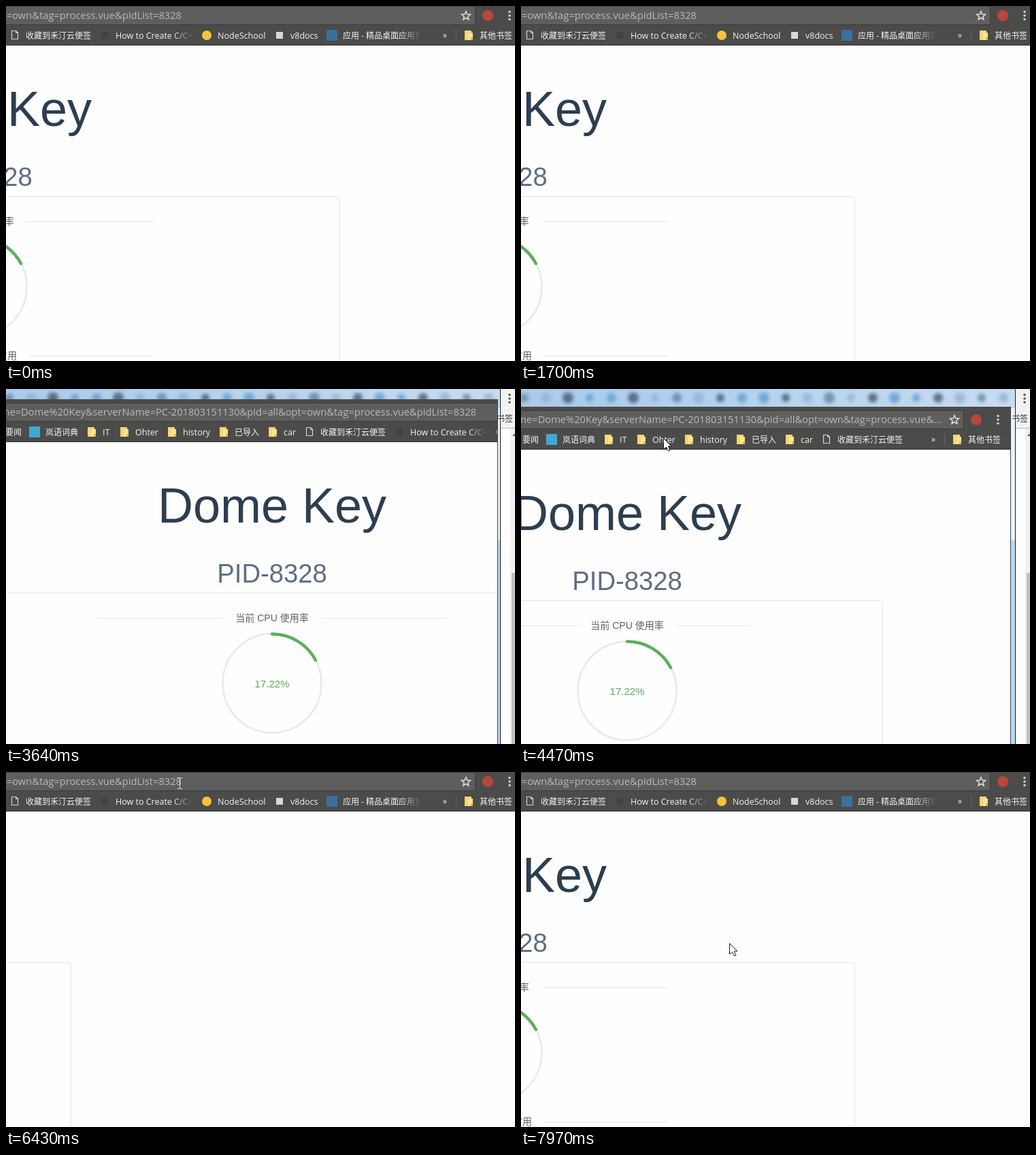
These frames come from a looping animation (748 px wide and 521 px high, 8 s). An HTML page with a canvas:

```html
<!DOCTYPE html>
<html lang="zh">
<head>
<meta charset="utf-8">
<style>
  html, body { margin: 0; width: 100%; height: 100%; overflow: hidden; background: #fefefe; }
  canvas { display: block; }
</style>
</head>
<body>
<canvas id="stage" width="748" height="521"></canvas>
<script>
const W = 748, H = 521, LOOP = 8000;
const ctx = document.getElementById('stage').getContext('2d');
const UI = "'Open Sans', 'Noto Sans CJK SC', 'Noto Sans CJK', sans-serif";
const PAGE = "'Liberation Sans', 'Noto Sans CJK SC', 'Noto Sans CJK', sans-serif";
const URL_START = 'name=Dome%20Key&serverName=PC-201803151130&pid=all&opt=own&tag=process.vue&';

// x: shift of left-aligned parts, right: window edge for right-aligned controls
const MAXIMIZED = { x: 0, y: 0, right: 758, clip: W, center: -42, half: 533 };
const SCROLLABLE = { ...MAXIMIZED, center: -50.5, half: 527, scrollbar: true };
const LIFTED = { x: 433, y: 20, right: 1191, clip: 722, center: 391, half: 533, floating: true };
const RESTORED = { x: 436, y: 31, right: 719, clip: 719, center: 156, half: 376, floating: true, narrow: true };
const REFLOWING = { ...MAXIMIZED, center: -340 + 60, half: 376 };

const LAYOUTS = [[0, MAXIMIZED], [2640, SCROLLABLE], [2800, MAXIMIZED], [3560, LIFTED],
  [3710, RESTORED], [6170, REFLOWING], [6560, MAXIMIZED]];

// time, x, y, shape; entries without a position hide the pointer
const POINTER = [
  [0], [180, 132, 15, 'beam'], [250],
  [2640, 190, 172, 'arrow'], [2710, 167, 153, 'arrow'], [2900, 120, 90, 'arrow'], [3250],
  [3850, 4, 163, 'arrow'], [4400, 190, 92, 'arrow'], [4560, 232, 46, 'beam'], [4630, 232, 38, 'beam'],
  [4710, 230, 26, 'arrow'], [5080, 241, 13, 'arrow'], [5250, 231, 2, 'arrow'], [5330, 242, 9, 'arrow'],
  [5540, 244, 13, 'arrow'], [5700, 244, 13, 'arrow'], [5850, 252, 14, 'arrow'],
  [6170, 255, 16, 'beam'], [6600, 255, 16, 'beam'], [6680, 262, 60, 'arrow'],
  [7030, 303, 235, 'arrow'], [7340, 306, 251, 'arrow'], [LOOP, 306, 251, 'arrow']
];

// label x, text, icon, icon colour, optional width at which the label fades out
const BOOKMARKS = [
  [-458, '今日要闻'],
  [-375, '岚语词典', 'square', '#3fa9d6'],
  [-291, 'IT', 'folder'], [-243, 'Ohter', 'folder'], [-173, 'history', 'folder'],
  [-97, '已导入', 'folder'], [-25, 'car', 'folder'],
  [29, '收藏到禾汀云便签', 'page'],
  [161, 'How to Create C/C++', 'small', '#3d4444', 114],
  [311, 'NodeSchool', 'dot', '#f2c43c'],
  [418, 'v8docs', 'small', '#d8d8d8'],
  [495, '应用 - 精品桌面应用集', 'square', '#3d6f9c', 114]
];

const last = (list, t) => list.filter(e => e[0] <= t).pop();

function rect(x, y, w, h, color) {
  ctx.fillStyle = color;
  ctx.fillRect(x, y, w, h);
}

function circle(x, y, r, color) {
  ctx.fillStyle = color;
  ctx.beginPath();
  ctx.arc(x, y, r, 0, 7);
  ctx.fill();
}

function text(str, x, y, size, color, family = PAGE, align = 'center') {
  ctx.font = `${size}px ${family}`;
  ctx.fillStyle = color;
  ctx.textAlign = align;
  ctx.fillText(str, x, y);
}

function polygon(points, fill, stroke, width = 1) {
  ctx.beginPath();
  points.forEach(([x, y]) => ctx.lineTo(x, y));
  ctx.closePath();
  if (fill) { ctx.fillStyle = fill; ctx.fill(); }
  if (stroke) { ctx.strokeStyle = stroke; ctx.lineWidth = width; ctx.stroke(); }
}

function menuDots(x, y, color) {
  for (const dy of [-5.5, 0, 5.5]) circle(x, y + dy, 1.8, color);
}

function icon(kind, x, y, color) {
  if (kind === 'folder') {
    rect(x - 6, y - 7, 10, 14, '#f6d673');
    rect(x - 1, y - 4, 7, 11, '#fbe394');
    rect(x + 3, y + 3, 3, 4, '#e3b94d');
  } else if (kind === 'page') {
    const px = x - 4.5, py = y - 6.5;
    polygon([[px, py], [px + 6, py], [px + 9, py + 3], [px + 9, py + 12], [px, py + 12]], null, '#d5d5d5', 1.2);
    polygon([[px + 6, py], [px + 6, py + 3], [px + 9, py + 3]], null, '#d5d5d5');
  } else if (kind === 'dot') circle(x, y, 7, color);
  else if (kind === 'square') rect(x - 8, y - 8, 16, 16, color);
  else if (kind === 'small') rect(x - 5, y - 5, 10, 10, color);
}

function label(str, x, y, fadeWidth) {
  let color = '#f4f4f4';
  if (fadeWidth) {
    color = ctx.createLinearGradient(x + fadeWidth - 30, 0, x + fadeWidth, 0);
    color.addColorStop(0, '#f4f4f4');
    color.addColorStop(1, '#f4f4f400');
  }
  text(str, x, y, /[^\x00-\x7f]/.test(str) ? 12 : 12.5, color, UI, 'left');
}

function drawToolbar({ x, right, narrow }) {
  rect(0, -5, W, 63, '#4b4b4a');
  rect(0, 0, right - 68, 28, '#3a3a3a');
  rect(0, 1, right - 69, 26, '#5e5e5d');
  rect(0, 57, W, 1, '#2f2f2f');
  if (narrow) text(URL_START + '...', right - 101, 19, 14.7, '#b9b9b9', UI, 'right');
  else text(URL_START + 'pidList=8328', x + 258, 19, 14.7, '#b9b9b9', UI, 'right');

  const star = Array.from({ length: 10 }, (_, i) => {
    const r = i % 2 ? 3 : 6.8, a = i * Math.PI / 5;
    return [right - 82 + r * Math.sin(a), 14.5 - r * Math.cos(a)];
  });
  polygon(star, null, '#dedede', 1.5);
  circle(right - 50, 14, 8, '#b8473c');
  menuDots(right - 18, 14, '#cfcfcf');

  for (const [bx, name, kind, color, fade] of BOOKMARKS) {
    if (narrow && bx > 29) break;
    icon(kind, x + bx - 16, 43, color);
    label(name, x + bx, 48, fade);
  }
  label('»', right - 116, 47);
  rect(right - 97, 35, 1, 16, '#686868');
  icon('folder', right - 78, 43);
  label('其他书签', right - 62, 48);
}

function divider(center, half, y, str, halfLabel) {
  const outer = half / 2 - 8;
  text(str, center, y + 5, 14, '#5e6166');
  for (const side of [-1, 1]) {
    const a = center + side * (halfLabel + 18), b = center + side * outer;
    rect(Math.round(Math.min(a, b)), y, Math.round(Math.abs(b - a)), 1, '#e6e7ea');
  }
}

function ring(x, y, r, share) {
  ctx.lineCap = 'round';
  for (const [part, color, width] of [[1, '#e8ebf1', 3], [share, '#58b058', 4.5]]) {
    ctx.strokeStyle = color;
    ctx.lineWidth = width;
    ctx.beginPath();
    ctx.arc(x, y, r, -Math.PI / 2, (part * 2 - 0.5) * Math.PI);
    ctx.stroke();
  }
  text((share * 100).toFixed(2) + '%', x, y + 6, 15, '#58ab57');
}

function drawPage({ center, half }) {
  rect(0, 58, W, H, '#fefefe');
  text('Dome Key', center, 176, 72, '#2c3e50');
  text('PID-8328', center, 264, 38.2, '#5e6d82');
  ctx.strokeStyle = '#e2e4e8';
  ctx.lineWidth = 1;
  ctx.beginPath();
  ctx.roundRect(Math.round(center - half) - 0.5, 279.5, half * 2, 600, 4);
  ctx.stroke();
  divider(center, half, 316, '当前 CPU 使用率', 54);
  ring(center, 412, 72.5, 0.1722);
  divider(center, half, 513, '当前进程 内存占用', 58);
}

function drawScrollbar(thumbTop) {
  rect(741, 58, 7, H, '#f1f1f1');
  rect(743, thumbTop, 5, H, '#c1c1c1');
  polygon([[744, 69], [748, 65], [748, 69]], '#555');
}

function drawBackdrop() {
  const glass = ctx.createLinearGradient(0, 0, W, 0);
  glass.addColorStop(0, '#a9cbea');
  glass.addColorStop(0.4, '#b2d2ee');
  glass.addColorStop(1, '#c9dcef');
  rect(0, 0, W, H, glass);
  const tints = ['#5c7fa0', '#4f86c4', '#6f7d8c', '#8fb0d0', '#ab7f8a', '#3f5168', '#5f9bd2'];
  ctx.save();
  ctx.filter = 'blur(2.5px)';
  ctx.globalAlpha = 0.75;
  for (let i = 0; i < 23; i++) circle(5 + i * 32, 13, 6 + i % 3, tints[i * i * 3 % 7]);
  ctx.restore();
  rect(720, 28, 6, 194, '#eaf3fb');
  rect(720, 222, 6, H, '#b9d8f3');

  rect(726, 0, 1, H, '#1d1d1d');
  rect(727, 0, 21, 57, '#f2f2f2');
  rect(727, 57, 21, 1, '#b5b5b5');
  rect(727, 58, 21, H, '#fefefe');
  menuDots(740, 14, '#5a5a5a');
  text('书签', 745, 48, 12, '#333', UI, 'right');
  drawScrollbar(270);
}

function drawWindow(layout) {
  if (layout.floating) {
    drawBackdrop();
    rect(layout.clip, layout.y - 5, 1, H, '#39444f');
  }
  ctx.save();
  ctx.beginPath();
  ctx.rect(0, Math.max(0, layout.y - 5), layout.clip, H);
  ctx.clip();
  ctx.translate(0, layout.y);
  drawPage(layout);
  drawToolbar(layout);
  if (layout.scrollbar) drawScrollbar(75);
  ctx.restore();
}

function drawPointer(t) {
  const from = last(POINTER, t);
  const [t0, x0, y0, shape] = from;
  if (!shape) return;
  const [t1, x1 = x0 - 140, y1 = y0 - 87] = POINTER[POINTER.indexOf(from) + 1];
  const k = (t - t0) / (t1 - t0);
  // hiding by leaving the stage applies only to the arrow
  const still = shape === 'beam' && t1 === 250;
  const x = still ? x0 : Math.round(x0 + (x1 - x0) * k);
  const y = still ? y0 : Math.round(y0 + (y1 - y0) * k);
  if (shape === 'beam') {
    rect(x, y - 7, 1, 15, '#e4e4e4');
    for (const dy of [-8, 8]) {
      rect(x - 3, y + dy, 3, 1, '#e4e4e4');
      rect(x + 1, y + dy, 3, 1, '#e4e4e4');
    }
    return;
  }
  const arrow = [[0, 0], [0, 16], [4, 12.5], [7, 18.5], [9.5, 17.5], [6.8, 11.5], [11.5, 11.5]];
  polygon(arrow.map(([ax, ay]) => [x + 0.5 + ax, y + 0.5 + ay]), '#fff', '#1a1a24');
}

function frame(now) {
  const t = now % LOOP;
  drawWindow(last(LAYOUTS, t)[1]);
  drawPointer(t);
  requestAnimationFrame(frame);
}
requestAnimationFrame(frame);
</script>
</body>
</html>
```
